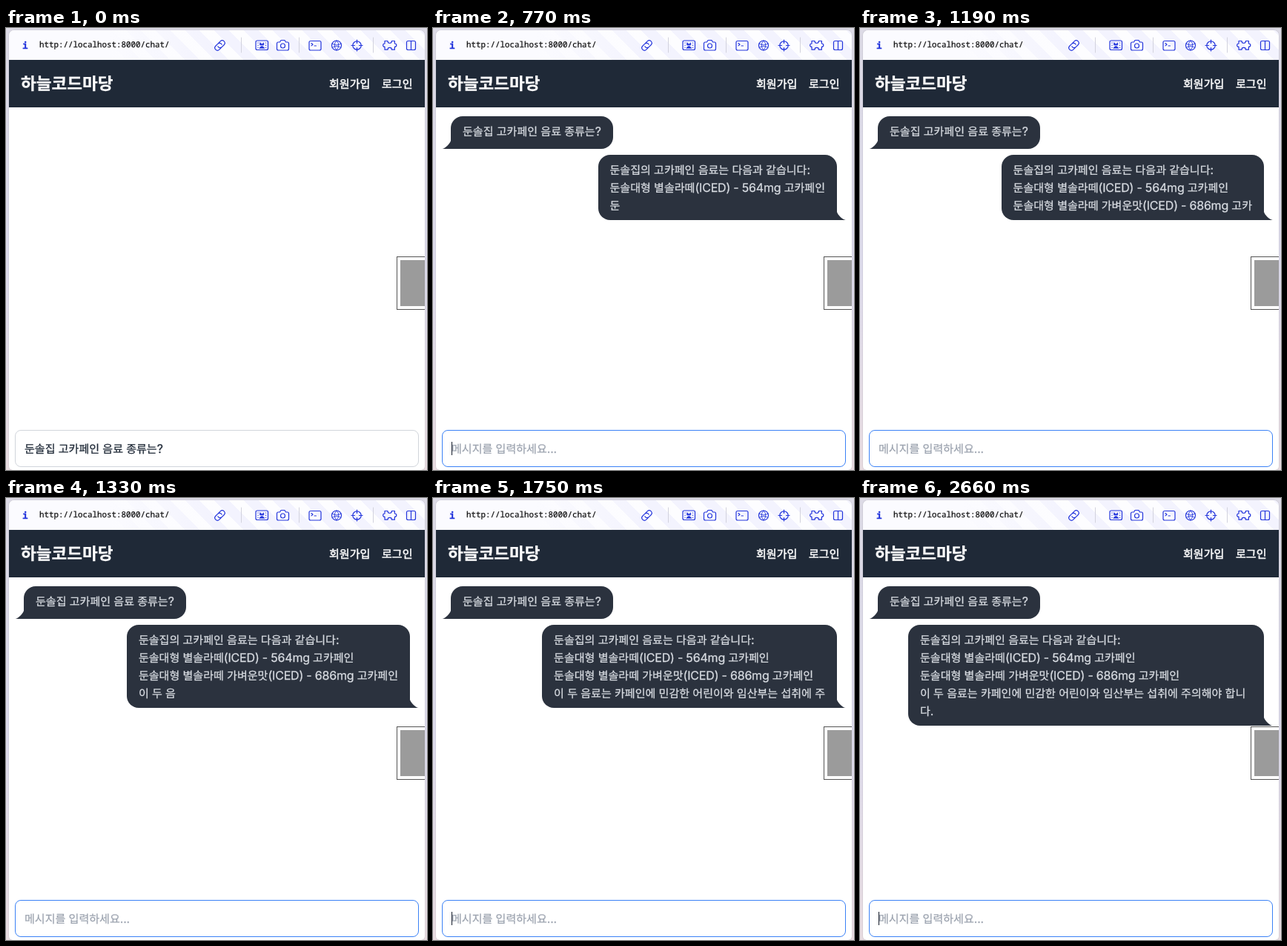
These frames come from a looping animation (568 px wide and 596 px high, 2730 ms). An HTML page:

```html
<!DOCTYPE html>
<html lang="ko">
<head>
<meta charset="utf-8">
<title>Chat</title>
<style>
  html, body { margin: 0; width: 100%; height: 100%; overflow: hidden; }
  body {
    position: relative;
    background: linear-gradient(#dddbe6, #dedcec 55%, #e9dde2);
    font: 16px/24px Inter, "Noto Sans CJK KR", "Noto Sans CJK", sans-serif;
    letter-spacing: -.18px;
    word-spacing: -.1px;
    text-rendering: geometricPrecision;
    -webkit-text-stroke: .25px;
  }
  body > *, header > *, .bar > * { position: absolute; white-space: pre; }
  .ko {
    font-family: "Noto Sans CJK KR", "Noto Sans CJK", sans-serif;
    font-size: .94em;
    line-height: 0;
    letter-spacing: 0;
  }

  .window {
    left: 4px; top: 3px; width: 561px; height: 593px;
    background: #fff;
    border-radius: 7px 7px 5px 5px;
    box-shadow: 0 0 2px #77778066;
  }
  .bar {
    left: 4px; top: 3px; width: 561px; height: 40px;
    border-radius: 7px 7px 0 0;
    background:
      linear-gradient(90deg, #fbfbff 0 24%, #fbfbff00 50%),
      repeating-linear-gradient(45deg, #f3f3fe 0 14px, #fdfdff 14px 28px);
  }
  .bar b, .url {
    font-family: "Noto Sans Mono", "DejaVu Sans Mono", monospace;
    letter-spacing: 0;
    line-height: 20px;
    top: 10px;
  }
  .bar b { left: 18px; font-size: 13px; color: #2436dc; }
  .url { left: 41px; font-size: 10.83px; font-weight: 500; color: #111; }
  .icons { left: 0; top: 0; }

  header {
    left: 4px; top: 43px; width: 561px; height: 64px;
    background: #1f2937;
    color: #fff;
  }
  h1 { margin: 0; left: 16px; top: 16px; font-size: 24px; line-height: 32px; font-weight: 700; }
  nav { top: 20px; font-weight: 500; -webkit-text-stroke-width: .5px; }

  .bubble {
    box-sizing: border-box;
    min-height: 44px; max-width: 480px;
    padding: 8px 16px;
    background: #2b323e;
    color: #d9dde3;
    border-radius: 16px;
    white-space: pre-wrap;
  }
  .bubble::after {
    content: "";
    position: absolute; bottom: 0;
    width: 12px; height: 12px;
    background: inherit;
  }
  #ask { left: 24px; top: 119px; border-bottom-left-radius: 0; }
  #ask::after { left: -11.9px; clip-path: path("M0 12H12V0C12 4 4 12 0 12"); }
  #reply { right: 23px; top: 171px; border-bottom-right-radius: 0; }
  #reply::after { right: -11.9px; clip-path: path("M0 0V12H12C8 12 0 4 0 0"); }

  .handle {
    box-sizing: border-box;
    left: 527px; top: 308px; width: 38px; height: 72px;
    border: 1px solid #555; border-right: 0;
    background: #fff;
  }
  .badge { left: 532px; top: 313px; width: 33px; height: 62px; background: #9b9b9b; }

  #field {
    box-sizing: border-box;
    left: 12px; top: 542px; width: 545px; height: 50px;
    padding: 12px;
    border: 1px solid #d1d5db; border-radius: 8px;
    background: #fff;
    color: #1f2937;
  }
  #field.empty { border-color: #3b82f6; color: #9ca3af; }
  #caret { left: 25px; top: 558px; width: 1px; height: 18px; background: #111827; }
</style>
</head>
<body>
<div class="window"></div>
<div class="bar"><b>i</b><span class="url">http://localhost:8000/chat/</span></div>

<svg class="icons" width="568" height="43" fill="none" stroke="#2436dc" stroke-width="1.2" stroke-linecap="round" stroke-linejoin="round">
  <path d="M317.5 13V33M395.5 13V33M495.5 13V33" stroke="#d2d2dd" stroke-width="1"/>
  <g transform="rotate(-45 288.5 23.5)">
    <path id="link" d="M287.5 27H284a3.5 3.5 0 0 1 0-7h4a3.5 3.5 0 0 1 3.3 4.500"/>
    <use href="#link" transform="rotate(180 288.5 23.5)"/>
  </g>
  <rect x="337" y="17" width="16.5" height="12.5" rx="2"/>
  <path d="M340 20h.1M340 23.3h.1M340 26.5h.1M350.5 20h.1M350.5 23.3h.1M350.5 26.5h.1"/>
  <path d="M342 27q3.3-5 6.6 0zM343 20l2.3 2 2.3-2v3h-4.6z" fill="#2436dc" stroke-width=".8"/>
  <path d="M367.5 19h2l1.5-2.5h5l1.5 2.5h2q2 0 2 2v7q0 2-2 2h-12q-2 0-2-2v-7q0-2 2-2z"/>
  <circle cx="373.5" cy="24" r="3"/>
  <rect x="409" y="17.5" width="16" height="12.5" rx="2"/>
  <path d="M412 20.5l2 1.7-2 1.7M416 24h2.5"/>
  <circle cx="446" cy="23.5" r="6.5"/>
  <path d="M440 21q6 4 12 0M440 26.5q6-4 12 0M446 17q-6 6 0 13M446 17q6 6 0 13" stroke-width=".9"/>
  <circle cx="473.5" cy="23.5" r="5.7"/>
  <path d="M473.5 16v4.5M473.5 26.5v4.5M466 23.5h4.5M476.5 23.5h4.5"/>
  <path d="M511 17.5h4q0 3 2.7 3t2.7-3h4v3.5q2.4 0 2.4 2.2t-2.4 2.2v3.8h-4q0-2.8-2.7-2.8t-2.7 2.8h-4v-3.8q-2.4 0-2.4-2.2t2.4-2.2z"/>
  <rect x="540.5" y="17.5" width="12" height="12" rx="2"/>
  <path d="M546.5 17.5v12"/>
</svg>

<header>
  <h1>하늘코드마당</h1>
  <nav style="left:432px">회원가입</nav>
  <nav style="left:503px">로그인</nav>
</header>

<div class="bubble" id="ask"></div>
<div class="bubble" id="reply"></div>
<div class="handle"></div>
<div class="badge"></div>
<div id="field"></div>
<div id="caret"></div>

<script>
  const LOOP = 2730, SENT = 560;
  const QUESTION = '둔솔집 고카페인 음료 종류는?';
  const HINT = '메시지를 입력하세요...';

  // Streamed reply: [time, added text]
  const CHUNKS = [
    [560, '둔솔집의 고카페인 음료는 다음과 같습니다:\n둔솔대형 별솔라떼(ICED)'],
    [630, ' - 564'],
    [700, 'mg 고'],
    [770, '카페인\n둔'],
    [840, '솔대형'],
    [980, ' 별솔'],
    [1050, '라떼 가'],
    [1120, '벼운맛(ICED)'],
    [1190, ' - 686mg 고카'],
    [1260, '페인'],
    [1330, '\n이 두 음'],
    [1400, '료는 카'],
    [1470, '페인에'],
    [1540, ' 민감한 어'],
    [1610, '린이와 임'],
    [1680, '산부는 섭'],
    [1750, '취에 주'],
    [1820, '의해야 합니다.']
  ];
  const CARET_ON = [[560, 1190], [1680, 2170], [2660, LOOP]];

  const $ = id => document.getElementById(id);

  // Hangul runs get their own, slightly smaller font.
  function write(el, text) {
    if (el.dataset.text === text) return;
    el.dataset.text = text;
    el.innerHTML = text.replace(/[가-힣]+/g, '<span class="ko">$&</span>');
  }

  const show = (el, on) => { el.style.visibility = on ? 'visible' : 'hidden'; };

  function draw(t) {
    const sent = t >= SENT;
    show($('ask'), sent);
    show($('reply'), sent);
    write($('reply'), CHUNKS.filter(c => c[0] <= t).map(c => c[1]).join(''));
    $('field').className = sent ? 'empty' : '';
    write($('field'), sent ? HINT : QUESTION);
    show($('caret'), CARET_ON.some(([from, to]) => t >= from && t < to));
  }

  document.querySelectorAll('h1, nav').forEach(el => write(el, el.textContent));
  write($('ask'), QUESTION);

  const start = performance.now();
  function tick() {
    draw((performance.now() - start) % LOOP);
    requestAnimationFrame(tick);
  }
  tick();
</script>
</body>
</html>
```
